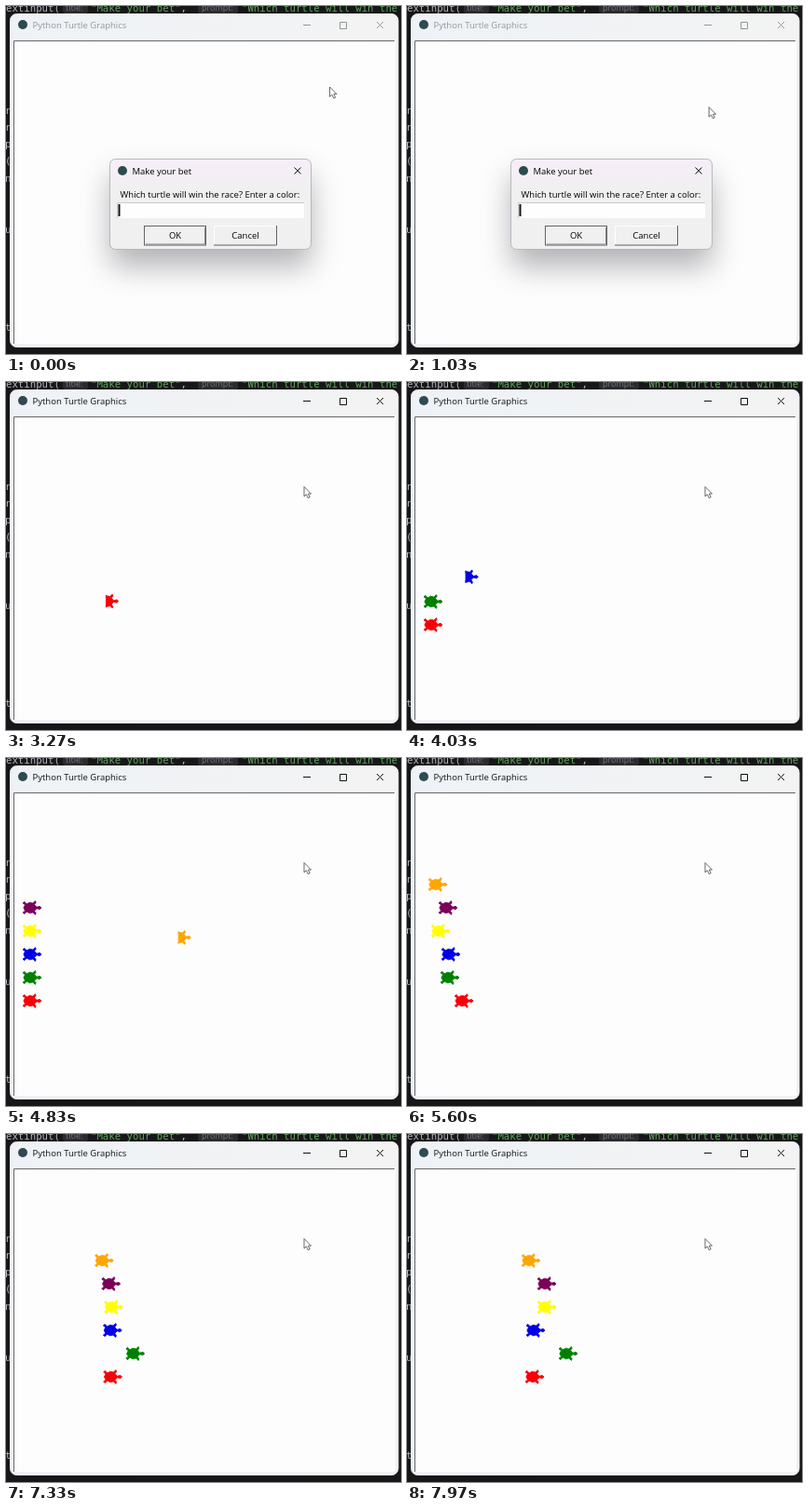
Recreate the animation shown at these times as an HTML page. Size 424 by 374 pixels, loop 8 s.

```html
<!DOCTYPE html>
<html lang="en">
<head>
<meta charset="utf-8">
<title>Turtle race</title>
<style>
  html, body { margin: 0; width: 100%; height: 100%; overflow: hidden; background: #17171a; }
  svg { display: block; }
  text { font: 9.5px "Open Sans", "Noto Sans", sans-serif; white-space: pre; }
  .code text { font: 10.7px "DejaVu Sans Mono", monospace; fill: #b4b6bc; }
  .code .string { fill: #62a35c; }
  .code .hint { font: 9px "Open Sans", sans-serif; fill: #77787e; }
  .line { fill: none; stroke: currentColor; }
  #frame { color: #96969a; }
  #frame.active { color: #111; }
</style>
</head>
<body>
<svg width="424" height="374" viewBox="0 0 424 374">
  <defs>
    <filter id="soft" x="-40%" y="-60%" width="180%" height="220%"><feGaussianBlur stdDeviation="16"/></filter>
    <linearGradient id="bar"><stop stop-color="#eef2f6"/><stop offset="1" stop-color="#f3f3f3"/></linearGradient>
    <linearGradient id="panel" x2="0" y2="1">
      <stop offset=".1" stop-color="#f5eef7"/><stop offset=".35" stop-color="#f0f0f0"/>
    </linearGradient>
  </defs>

  <g class="code">
    <rect width="424" height="374" fill="#17171a"/>
    <rect x="61" y="-4" width="27" height="12" rx="3" fill="#2b2b30"/>
    <rect x="206" y="-4" width="43" height="12" rx="3" fill="#2b2b30"/>
    <text x="0" y="6">extinput(</text>
    <text class="hint" x="64" y="5">title:</text>
    <text class="string" x="91" y="6">"Make your bet"<tspan fill="#b4b6bc">,</tspan></text>
    <text class="hint" x="210" y="5">prompt:</text>
    <text class="string" x="253" y="6">"Which turtle will win the</text>
    <g id="margin"></g>
  </g>

  <g id="frame">
    <rect x="4.5" y="8.5" width="416.5" height="358" rx="7" fill="url(#bar)" stroke="#e6e8ec"/>
    <rect x="8" y="37" width="410" height="326" fill="#fdfdfd"/>
    <path d="M8.5 363V37.5H417" class="line" style="stroke:#66666a"/>
    <circle cx="18" cy="20" r="5" fill="#2c4a50"/>
    <text x="28.5" y="24" fill="currentColor">Python Turtle Graphics</text>
    <path class="line" d="M319 20.5h8M358.5 17.5h7v7h-7zM398 17l7 7m0-7l-7 7"/>
  </g>

  <g id="turtles" stroke-width=".8" stroke-linejoin="round"></g>

  <g id="dialog">
    <rect x="112" y="182" width="215" height="98" rx="8" fill="#4c4c54" opacity=".42" filter="url(#soft)"/>
    <rect x="111.5" y="164.5" width="216" height="97" rx="6" fill="url(#panel)" stroke="#b8b8bc"/>
    <circle cx="125" cy="177" r="5" fill="#2c4a50"/>
    <text x="135.5" y="181">Make your bet</text>
    <path d="M309.5 173.5l7 7m0-7l-7 7" stroke="#111"/>
    <text x="122.5" y="206">Which turtle will win the race? Enter a color:</text>
    <rect x="120" y="212" width="200" height="16" fill="#fefefe"/>
    <path d="M119.5 228V211.5H320" class="line" style="stroke:#cacace"/>
    <text id="entry" x="121" y="224"></text>
    <rect id="caret" y="213" width="2" height="13" fill="#111"/>
    <rect x="148.5" y="236.5" width="66" height="20.5" fill="#f0f0f0" stroke="#606064"/>
    <path d="M149.5 256V237.5H213" class="line" style="stroke:#fff"/>
    <path d="M213.5 238V256H150" class="line" style="stroke:#88888c"/>
    <text x="181.5" y="250" text-anchor="middle">OK</text>
    <path d="M223.5 257V236.5H290" class="line" style="stroke:#fff"/>
    <path d="M290.5 236V257H223" class="line" style="stroke:#606064"/>
    <text x="257" y="250" text-anchor="middle">Cancel</text>
  </g>

  <path id="pointer" d="M.5 .5V11l2.4-2.2 1.8 3.9 1.9-.9-1.7-3.7H8z" fill="#fdfdfd" stroke="#444448" stroke-width=".8"/>
</svg>

<script>
const LOOP = 8000;
const HOME = { x: 213.5, y: 203 };
const START_X = 24.7;
const SCALE = 0.83;
const SETUP = 3080, SETUP_STEP = 340;
const CLOSE = 2750;
const STAGES = [5200, 5600, 6700, 7970];
const ROUNDS = [4, 11, 13];
const RACERS = [
  ["#f80008", 57.7, 83.7, 133.7],
  ["#008000", 42.7, 99.7, 169.7],
  ["#0000e4", 43.7, 84.7, 134.7],
  ["#ffff00", 32.7, 84.7, 146.7],
  ["#7a0058", 40.7, 85.7, 146.7],
  ["#ffa500", 29.7, 77.7, 129.7]
];
const KEYS = [[2130, "b"], [2260, "bl"], [2380, "blu"], [2490, "blue"]];

const $ = id => document.getElementById(id);
const clamp = v => Math.min(1, Math.max(0, v));
const mix = (a, b, u) => a + (b - a) * u;
const smooth = u => u * u * (3 - 2 * u);

function add(parent, name, attrs, text = "") {
  const node = document.createElementNS("http://www.w3.org/2000/svg", name);
  for (const key in attrs) node.setAttribute(key, attrs[key]);
  node.textContent = text;
  return parent.appendChild(node);
}

let seed = 7;
function random() {
  seed = (seed * 16807) % 2147483647;
  return seed / 2147483647;
}

// One side of the shape from nose to tail, mirrored for the other.
const side = [[16, 0], [14, 2], [10, 1], [7, 4], [9, 7], [8, 9], [5, 6], [1, 7],
  [-3, 5], [-6, 8], [-8, 6], [-5, 4], [-7, 0]];
const outline = side.concat(side.slice(1, -1).reverse().map(([x, y]) => [x, -y]));
const toPoints = list => list.map(p => p.map(v => v * SCALE).join()).join(" ");
const WHOLE = toPoints(outline);
const FRONT = toPoints(outline.map(([x, y]) => [Math.max(0, x), y]));

// Running share of a stage covered after each round of random steps.
function shares(rounds) {
  const sums = [0];
  for (let i = 0; i < rounds; i++) sums.push(sums[i] + 0.25 + random());
  return sums.map(s => s / sums[rounds]);
}

const turtles = RACERS.map(([color, ...stops], index) => ({
  node: add($("turtles"), "polygon", { fill: color, stroke: color }),
  index,
  y: 261 - 25 * index,
  stops: [START_X, ...stops],
  shares: ROUNDS.map(shares)
}));

for (const [y, char] of [[116, "r"], [134, "r"], [152, "p"], [170, "("], [189, "n"], [244, "u"], [349, "t"]])
  add($("margin"), "text", { x: -1, y }, char);

function raceX(turtle, t) {
  if (t < STAGES[0]) return START_X;
  const stage = t < STAGES[1] ? 0 : t < STAGES[2] ? 1 : 2;
  const rounds = ROUNDS[stage], part = turtle.shares[stage];
  const at = clamp((t - STAGES[stage]) / (STAGES[stage + 1] - STAGES[stage])) * rounds;
  const round = Math.min(rounds - 1, Math.floor(at));
  const turn = clamp((at - round) * turtles.length - turtle.index);
  return mix(turtle.stops[stage], turtle.stops[stage + 1], mix(part[round], part[round + 1], turn));
}

function drawTurtle(turtle, t) {
  const u = (t - SETUP) / SETUP_STEP - turtle.index;
  turtle.node.style.display = u < 0 ? "none" : "";
  const moving = u < 1;
  const x = moving ? mix(HOME.x, START_X, u) : raceX(turtle, t);
  const y = moving ? mix(HOME.y, turtle.y, u) : turtle.y;
  turtle.node.setAttribute("points", moving ? FRONT : WHOLE);
  turtle.node.setAttribute("transform", `translate(${x} ${y})`);
}

function drawEntry(t) {
  let typed = "", since = 0;
  for (const [time, text] of KEYS) if (t >= time) [since, typed] = [time, text];
  $("entry").textContent = typed;
  $("caret").setAttribute("x", 120.5 + (typed ? $("entry").getComputedTextLength() : 0));
  $("caret").style.display = (t - since) % 900 < 600 ? "" : "none";
}

function draw(t) {
  const glide = smooth(clamp((t - 200) / 1100));
  $("pointer").setAttribute("transform", `translate(${mix(347, 319.5, glide)} ${mix(86.5, 112, glide)})`);
  const fade = 1 - clamp((t - CLOSE) / 100);
  $("dialog").style.opacity = fade;
  $("dialog").style.display = fade ? "" : "none";
  $("frame").classList.toggle("active", t >= CLOSE);
  drawEntry(t);
  turtles.forEach(turtle => drawTurtle(turtle, t));
}

const begin = performance.now();
function tick() {
  draw((performance.now() - begin) % LOOP);
  requestAnimationFrame(tick);
}
tick();
</script>
</body>
</html>
```
